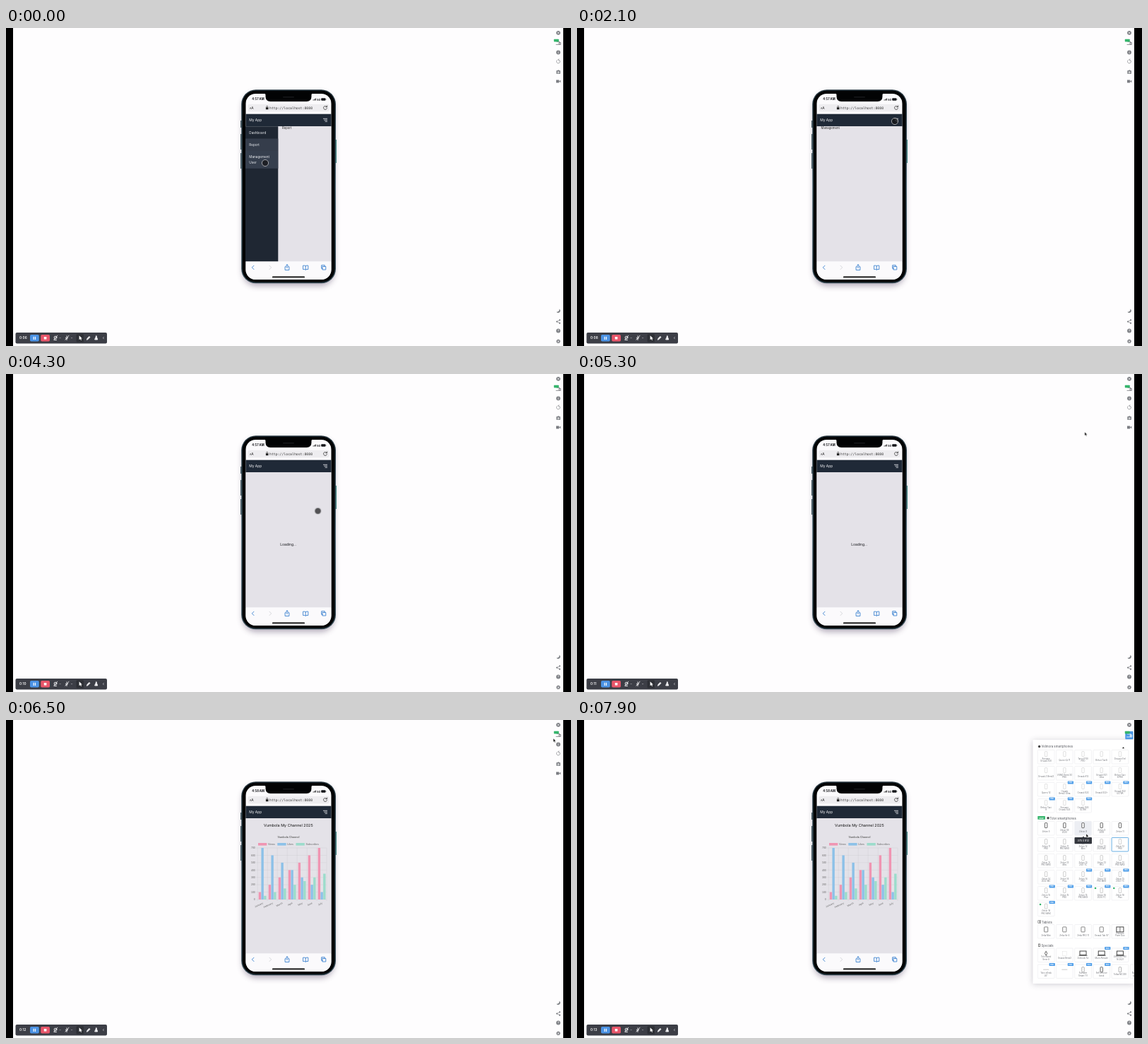
An HTML page for the animation above (8 s loop, 800x450 px).

```html
<!DOCTYPE html>
<html lang="en">
<head>
<meta charset="utf-8">
<title>Mobile preview</title>
<style>
html, body { margin: 0; width: 100%; height: 100%; overflow: hidden; background: #fefdfe; }
svg { display: block; width: 100vw; height: 100vh; font-family: Inter, sans-serif; }
.arial { font-family: "Liberation Sans", Arial, sans-serif; }
.mono { font-family: "DejaVu Sans Mono", monospace; }
.line { fill: none; stroke: currentColor; stroke-linecap: round; stroke-linejoin: round; }
.mid { text-anchor: middle; }
.end { text-anchor: end; }

/* hard switches */
.sw { opacity: 0; animation: 8s step-end infinite; }
.sidebar { animation-name: sidebar; }
.report { animation-name: report; }
.manage { animation-name: manage; }
.manage-wide { animation-name: manage-wide; }
.dash-hover { animation-name: dash-hover; }
.loading { animation-name: loading; }
.chart { animation-name: chart; }
.clock-a { animation-name: clock-a; }
.clock-b { animation-name: clock-b; }
.touch { animation-name: touch; }
.arrow { animation-name: arrow; }
.device-off { animation-name: device-off; }
.device-on { animation-name: device-on; }
.tip { animation-name: tip; }
.ghost { animation-name: ghost; }
.sec { animation-name: sec; }
@keyframes sidebar { 0% { opacity: 1 } 21.1% { opacity: 0 } 29.9% { opacity: 1 } 44.9%, 100% { opacity: 0 } }
@keyframes report { 0% { opacity: 1 } 3.6%, 100% { opacity: 0 } }
@keyframes manage { 0% { opacity: 0 } 3.6% { opacity: 1 } 21.1% { opacity: 0 } 29.9% { opacity: 1 } 44.9%, 100% { opacity: 0 } }
@keyframes manage-wide { 0% { opacity: 0 } 21.1% { opacity: 1 } 29.9%, 100% { opacity: 0 } }
@keyframes dash-hover { 0% { opacity: 0 } 37.4%, 100% { opacity: 1 } }
@keyframes loading { 0% { opacity: 0 } 44.9% { opacity: 1 } 67.4%, 100% { opacity: 0 } }
@keyframes chart { 0% { opacity: 0 } 67.4%, 100% { opacity: 1 } }
@keyframes clock-a { 0% { opacity: 1 } 81.2%, 100% { opacity: 0 } }
@keyframes clock-b { 0% { opacity: 0 } 81.2%, 100% { opacity: 1 } }
@keyframes touch { 0% { opacity: 1 } 55.2%, 100% { opacity: 0 } }
@keyframes arrow { 0% { opacity: 0 } 55.2%, 100% { opacity: 1 } }
@keyframes device-off { 0% { opacity: 1 } 83.7%, 100% { opacity: 0 } }
@keyframes device-on { 0% { opacity: 0 } 83.7%, 100% { opacity: 1 } }
@keyframes tip { 0% { opacity: 0 } 98.6%, 100% { opacity: 1 } }
@keyframes ghost { 0% { opacity: 0 } 95%, 100% { opacity: 1 } }
@keyframes sec { 0% { opacity: 1 } 12.5%, 100% { opacity: 0 } }

/* smooth motion */
.pointer { animation: pointer 8s ease-in-out infinite; }
@keyframes pointer {
  0%, 8.5% { transform: translate(367px, 191px) }
  18.75%, 34.5% { transform: translate(450px, 132px) }
  38.6%, 45.5% { transform: translate(363px, 147px); animation-timing-function: ease-in }
  53.75% { transform: translate(441px, 194px); animation-timing-function: ease-out }
  64%, 66% { transform: translate(720px, 84px) }
  72% { transform: translate(661px, 94px); animation-timing-function: ease-in }
  76.25% { transform: translate(753px, 51px); animation-timing-function: ease-out }
  84.5%, 93.5% { transform: translate(782px, 22px) }
  98.6%, 100% { transform: translate(722px, 163px) }
}
.bars { transform-origin: 0 254px; animation: grow 8s infinite; }
@keyframes grow {
  0%, 68.36% { transform: scaleY(0); animation-timing-function: cubic-bezier(.25, 1, .5, 1) }
  80.86%, 100% { transform: scaleY(1) }
}
.panel { animation: fade 8s linear infinite; }
@keyframes fade { 0%, 86.8% { opacity: 0 } 87.5% { opacity: .35 } 88.75% { opacity: .75 } 91.25%, 100% { opacity: 1 } }
</style>
</head>
<body>
<svg viewBox="0 0 800 450">
  <defs>
    <filter id="soft" x="-30%" y="-20%" width="160%" height="140%"><feGaussianBlur stdDeviation="4"/></filter>
    <linearGradient id="frame" x2="0" y2="1"><stop stop-color="#24343d"/><stop offset=".5" stop-color="#4d6874"/><stop offset="1" stop-color="#2c414b"/></linearGradient>
    <clipPath id="screen"><rect x="339.5" y="93" width="121" height="263" rx="14"/></clipPath>
    <clipPath id="page"><rect x="339" y="139" width="122" height="191.5"/></clipPath>
  </defs>
  <rect width="800" height="450" fill="#fefdfe"/>

  <!-- phone body -->
  <rect x="335" y="92" width="130" height="273" rx="20" fill="#435" opacity=".4" filter="url(#soft)"/>
  <path d="M332.8 131v10M332.8 150v22M332.8 177v22" stroke="#31454f" stroke-width="1.4"/>
  <path d="M467.4 158v33" stroke="#3d8580" stroke-width="1.3"/>
  <rect x="333.2" y="87.3" width="133.8" height="274" rx="20.5" fill="url(#frame)"/>
  <rect x="334.6" y="88.8" width="131" height="271" rx="19" fill="#020304"/>

  <g clip-path="url(#screen)">
    <rect x="339" y="93" width="122" height="264" fill="#fbfafc"/>
    <path d="M365 92h70q-2.500 .5-2.500 3v2q0 7-7 7h-51q-7 0-7-7v-2q0-2.500-2.500-3z" fill="#020304"/>
    <rect x="392" y="97" width="16" height="1.600" rx=".8" fill="#17181b"/>
    <g font-size="4.200" font-weight="700" fill="#15161a">
      <text class="sw clock-a" x="348.300" y="102.300">4:57 AM</text>
      <text class="sw clock-b" x="348.300" y="102.300">4:58 AM</text>
      <text x="440.200" y="102.500" font-size="3.700">5G</text>
    </g>
    <path d="M435 102.500v-1M436.200 102.500v-1.700M437.400 102.500v-2.400M438.600 102.500v-3" stroke="#222" stroke-width=".8"/>
    <rect x="446.200" y="99.300" width="6.300" height="3.500" rx="1" fill="#15161a"/>
    <path d="M453 100.400v1.300" stroke="#333" stroke-width=".6"/>

    <rect x="342.300" y="107.800" width="115.500" height="10.400" rx="2.600" fill="#eeedf0"/>
    <text x="345" y="115" font-size="3.600" fill="#222">A</text>
    <text x="347.300" y="115" font-size="4.800" fill="#222">A</text>
    <rect x="367.900" y="112.300" width="3.600" height="3" rx=".5" fill="#222"/>
    <path class="line" d="M368.700 112.300v-1a1 1 0 0 1 2 0v1" color="#222" stroke-width=".6"/>
    <text class="mono" x="373" y="114.600" font-size="4.830" fill="#333">http://localhost:8080</text>
    <path class="line" d="M454.200 111.600a2.500 2.500 0 1 0 .3 2M454.500 110v1.800h-1.800" color="#222" stroke-width=".7"/>

    <rect x="339" y="121.700" width="122" height="17.500" fill="#1f2937"/>
    <text x="344.300" y="132.200" font-size="4.900" fill="#f3f4f6">My App</text>
    <path d="M449 128.300h6M450.300 130.300h4.700M451.600 132.300h3.400" stroke="#e8eaee" stroke-width=".8"/>

    <!-- page -->
    <rect x="339" y="139.200" width="122" height="191.300" fill="#e4e2e8"/>
    <g clip-path="url(#page)" font-size="4.250" fill="#222">
      <text class="sw report" x="391" y="143.400">Report</text>
      <text class="sw manage" x="391" y="143.400">Management</text>
      <text class="sw manage-wide" x="345.600" y="143.400">Management</text>
    </g>
    <text class="sw loading mid" x="399.700" y="243.200" font-size="4.950" fill="#15161a">Loading...</text>

    <g class="sw sidebar">
      <rect x="339" y="139.200" width="46.300" height="191.300" fill="#1f2733"/>
      <rect class="sw dash-hover" x="339" y="139.200" width="46.300" height="17.300" fill="#303845"/>
      <rect class="sw report" x="339" y="156.500" width="46.300" height="17.500" fill="#353d4b"/>
      <rect x="339" y="174" width="46.300" height="24.800" fill="#363f4e"/>
      <g font-size="4.650" fill="#eceef2">
        <text x="344.300" y="149.700">Dashboard</text>
        <text x="344.300" y="167">Report</text>
        <text x="344.300" y="184.400">Management</text>
        <text x="344.300" y="191.600">User</text>
      </g>
    </g>

    <g class="sw chart">
      <text class="mid" x="399.800" y="151.400" font-size="5.450" fill="#111">Vumbola My Channel 2025</text>
      <g class="arial" font-size="3.700" fill="#666">
        <text class="mid" x="400" y="166.500" font-weight="700">Vumbola Channel</text>
        <g id="axes"></g>
      </g>
      <g class="bars" id="bars"></g>
    </g>

    <!-- browser bar -->
    <rect x="339" y="330.500" width="122" height="26" fill="#fbfafc"/>
    <g class="line" color="#3b82d0" stroke-width=".9">
      <path d="M351 336.200l-2.700 2.700 2.700 2.700"/>
      <path d="M373 336.200l2.700 2.700-2.700 2.700" color="#d3d4d8"/>
      <path d="M396.600 337.800h-1.500v4.700h5.800v-4.700h-1.500M398 339.800v-5M396.500 336.200l1.500-1.500 1.500 1.500"/>
      <path d="M424.200 336.800q-1.800-1.200-3.600-.6v5.400q1.800-.5 3.600.5q1.800-1 3.600-.5v-5.400q-1.800-.6-3.600.6v5.300"/>
      <path d="M448.300 337.500h4.500v4.500h-4.500zM448.300 340.300h-1.600v-4.600h4.600v1.800"/>
    </g>
    <rect x="377" y="351.600" width="46" height="1.700" rx=".85" fill="#050505"/>
  </g>

  <!-- recorder -->
  <rect x="13.500" y="431" width="129.500" height="15.500" rx="2" fill="#3c3e46"/>
  <g id="timer" font-size="4.700" font-weight="600" fill="#fff"></g>
  <rect x="34" y="434" width="12.800" height="9.600" rx="1.800" fill="#4b92e4"/>
  <path d="M39.200 436.700v4.200M41.500 436.700v4.200" stroke="#fff" stroke-width="1.200"/>
  <rect x="49.200" y="434" width="12.800" height="9.600" rx="1.800" fill="#e8566a"/>
  <rect x="53.800" y="437" width="3.600" height="3.600" rx=".4" fill="#fff"/>
  <rect x="99.500" y="433" width="10.500" height="11.500" rx="1.500" fill="#2d2f35"/>
  <g class="line" color="#f2f2f4" stroke-width=".9">
    <circle cx="70" cy="438" r="1.900"/><path d="M68.500 441.500h3M67.700 441.200l5-6"/>
    <path d="M86 435.800v2.800M84.300 438.400q1.700 2.800 3.400 0M86 440v1.600M84 441.200l5-6"/>
    <path d="M76 438.500l.6.600.6-.6M92.500 438.500l.6.600.6-.6" stroke-width=".5"/>
    <path d="M114.500 441l.6-1.800 2.800-2.800 1.100 1.100-2.800 2.800z" fill="#f2f2f4"/>
    <path d="M126 441h3.700l-1-3h-1.600zM127.300 438v-2.200h1v2.200" fill="#f2f2f4"/>
    <path d="M138.400 437.400l-1 1.200 1 1.200" stroke-width=".6"/>
  </g>
  <path d="M103.600 435.300v6l1.500-1.300 1 2 .9-.5-1-1.900 1.900-.2z" fill="#fff"/>

  <!-- tool icons -->
  <g fill="#7b7d82">
    <circle cx="782" cy="6.800" r="2.900"/><circle cx="782" cy="34.500" r="2.900"/><circle cx="782" cy="428.500" r="2.900"/>
    <path d="M779.300 60.300h1.400l.6-.8h1.600l.6.800h1.400v4.500h-5.600zM779 73.500h4v4h-4zM783.300 75l2-1.300v3.600l-2-1.300z"/>
    <path d="M783.400 397.500a3 3 0 1 1-4 4.300a3.600 3.600 0 0 0 4-4.300z"/>
    <circle cx="780" cy="415.500" r="1.100"/><circle cx="784" cy="413.300" r="1.100"/><circle cx="784" cy="417.700" r="1.100"/>
  </g>
  <g class="line" color="#7b7d82" stroke-width=".7">
    <path d="M780.200 45.600a2.500 2.500 0 1 0 2-.7M782.800 43.800l-1 1.100 1 1M784 413.300l-4 2.200 4 2.200"/>
    <circle cx="782" cy="443.400" r="1.700" stroke-width="1.500"/>
    <circle cx="782" cy="443.400" r="2.700" stroke-width=".8" stroke-dasharray="1 1.120" stroke-linecap="butt"/>
  </g>
  <g class="line" color="#fff" stroke-width=".7">
    <path d="M780.900 5.700l2.200 2.200M783.100 5.700l-2.200 2.200M782 34.200v1.700M782 32.800v.1"/>
    <path d="M781.100 427.600q.9-1.400 1.800-.2q0 .7-.9 1.200M782 430v.1" stroke-width=".6"/>
    <circle cx="782" cy="62.600" r="1"/>
  </g>
  <g class="sw device-off">
    <path class="line" d="M779 23.500h3.500M780 19.500h4v4M783.300 20.500h2v3h-2z" color="#7b7d82" stroke-width=".8"/>
  </g>
  <rect class="sw device-off" x="775.800" y="15.800" width="7" height="3.600" rx=".6" fill="#35b56c"/>

  <g class="panel">
    <rect x="645" y="29" width="144" height="345" fill="#556" opacity=".28" filter="url(#soft)"/>
    <rect x="645.500" y="28" width="143" height="345" fill="#fff"/>
    <g id="devices" fill="#6d6f75"></g>
  </g>
  <path class="sw ghost" d="M773.500 38l1.500 2.300h-3z" fill="#222"/>
  <g class="sw device-on">
    <rect x="776.300" y="16" width="11.200" height="11.300" rx=".8" fill="#4a97e6"/>
    <path class="line" d="M778.500 24h4M779.500 20h4.500v4M783.700 21h2v3h-2z" color="#fff" stroke-width=".8"/>
    <rect x="775.800" y="15.800" width="7" height="3.600" rx=".6" fill="#35b56c"/>
  </g>
  <g class="sw tip">
    <path d="M715.600 166l1.400-1.600 1.400 1.600h9.600q1 0 1 1v7.300q0 1-1 1h-22.500q-1 0-1-1v-7.300q0-1 1-1z" fill="#33363d"/>
    <text class="mid" x="716.700" y="172" font-size="3.700" fill="#fff">375 x 812</text>
  </g>

  <rect width="10" height="450"/><rect x="789" width="11" height="450"/>

  <g class="pointer">
    <circle class="sw touch" r="4.600" fill="#141416" fill-opacity=".7" stroke="#d8d8dc" stroke-opacity=".75" stroke-width=".9"/>
    <path class="sw arrow" d="M-1-2v5.200l1.200-1.100.9 1.800.9-.4-.9-1.800h1.600z" fill="#111" stroke="#fff" stroke-width=".4"/>
  </g>
</svg>
<script>
const fill = (id, html) => { document.getElementById(id).innerHTML = html; };
const range = n => [...Array(n).keys()];
const rect = (x, y, w, h, attrs = '') => `<rect x="${x}" y="${y}" width="${w}" height="${h}" ${attrs}/>`;
const text = (x, y, s, attrs = '') => `<text x="${x}" y="${y}" ${attrs}>${s}</text>`;
const path = (d, attrs) => `<path d="${d}" fill="none" ${attrs}/>`;

fill('timer', range(8).map(i =>
  text(19, 440.4, `0:${String(6 + i).padStart(2, '0')}`, `class="sw sec" style="animation-delay:${i ? i - 8 : 0}s"`)).join(''));

// bar chart
const left = 356.2, base = 254, slot = 14, unit = 73 / 700;
const colors = ['#f095b2', '#8cc1e8', '#9cdccb'];
const months = ['January', 'February', 'March', 'April', 'May', 'June', 'July'];
const legend = [['Views', 357], ['Likes', 384.3], ['Subscribes', 410.5]];
const grid = 'stroke="#000" stroke-opacity=".1" stroke-width=".4"';
fill('axes',
  legend.map(([name, x], i) => rect(x, 174, 12.3, 3.6, `fill="${colors[i]}"`) + text(x + 14, 177.1, name)).join('') +
  range(8).map(i => {
    const y = base - i * 100 * unit;
    return path(`M353.800 ${y}H${left + 7 * slot}`, grid) +
      path(`M${left + i * slot} 181V256`, grid) +
      text(352.8, y + 1.3, i * 100, 'class="end" font-size="3.5"');
  }).join('') +
  months.map((m, i) => {
    const x = left + (i + .5) * slot + .8;
    return text(x, 260, m, `class="end" font-size="3.5" transform="rotate(-26 ${x} 260)"`);
  }).join(''));
fill('bars', range(7).map(i => [100 * (i + 1), 700 - 100 * i, 50 * (i + 1)].map((v, k) =>
  rect(left + i * slot + 1.5 + k * 3.73, base - v * unit, 3.4, v * unit, `fill="${colors[k]}"`)).join('')).join(''));

// device panel: [row centre, icon, labels, columns with a tag]
const rows = [
  [52, 'thin', 'Sorvane/Orvask S20;Quorvi Qi 11;Tarvol P30/PRO;Belvor Tavi5;Dovarin Fjel/2', ''],
  [75, 'thin', 'Orvask Z Bend3;VUMO Seek X3/PRO;Orvask A12;Orvask S21/Ultra;Belvor Tavi/6 PRO', ''],
  [98, 'thin', 'Quorvi 12;Orvask/Bend2 Ultra;Orvask S22;Orvask S22+;Orvask S22/ULTRA', '1234'],
  [121, 'thin', 'Belvor Tavi/8;Sorvane/Orvask S24;Orvask S24/ULTRA', '012'],
  [153, 'bold', 'Zelvin 5;Zelvin SE/2020;Zelvin 8;Zelvin X/2018;Zelvin 11', ''],
  [176, 'phone', 'Zelvin 11/PRO;Zelvin 11/PRO MAX;Zelvin 12/Mini;Zelvin 12/2020 MC;Zelvin 12/PRO', ''],
  [199, 'phone', 'Zelvin 12/PRO MAX;Zelvin 13/Mini;Zelvin 13/2021 TC;Zelvin 13/PRO;Zelvin 13/PRO MAX', ''],
  [222, 'phone', 'Zelvin 14/2022 MC;Zelvin 14/Plus;Zelvin 14/PRO;Zelvin 14/PRO MAX;Zelvin 15/2023 TC', '234'],
  [245, 'phone', 'Zelvin 15/Plus;Zelvin 15/PRO;Zelvin 15/PRO MAX;Zelvin 16/2024 TC;Zelvin 16/Plus', '01234'],
  [267.5, 'phone', 'Zelvin 16/PRO MAX', '0'],
  [299, 'tablet', 'Zelta Mini;Zelta Air 4;Zelta PRO 11;Orvask Tab S7;Plenivox/Pane Duo', ''],
  [332.5, 'special', 'Tolvi Band/Serie 6;Orvask Bend2;Zorbook Air;Murn Altitude;Zorbook PRO/16 2021', '34'],
  [355.5, 'special', 'Tolvi zDesk/24&quot;;Sorvane/Smart TV;Self service/kiosk;Tolba MC330;Non-branded/smartphone', '0123'],
];
const stroke = (w, c = '#555') => `fill="#fff" stroke="${c}" stroke-width="${w}"`;
const phone = (x, y, w, c) => rect(x - 1.7, y - 3.5, 3.4, 7, `rx=".6" ${stroke(w, c)}`);
const laptop = (x, y) => rect(x - 4.5, y - 3.2, 9, 5.6, stroke(.9, '#333')) + path(`M${x - 6} ${y + 3.1}h12`, 'stroke="#444" stroke-width=".8"');
const icons = {
  thin: (x, y) => phone(x, y, .35, '#aaa'),
  phone: (x, y) => phone(x, y, .4, '#888'),
  bold: (x, y) => phone(x, y, .8, '#444'),
  tablet: (x, y, i) => i < 4
    ? rect(x - 2.6, y - 2.2, 5.2, 7, `rx=".6" ${stroke(.7, '#555')}`)
    : rect(x - 5, y - 2.2, 10, 7, stroke(.9, '#333')) + path(`M${x} ${y - 2}v6.600`, 'stroke="#333" stroke-width=".7"'),
  special: (x, y, i, c) => {
    y += 1.6;
    if (c < 340) return i > 1 ? laptop(x, y)
      : i ? rect(x - 3, y - 3, 6, 6, stroke(.3, '#ccc'))
      : path(`M${x} ${y - 3.5}v7`, 'stroke="#777" stroke-width="1.3"') + `<circle cx="${x}" cy="${y}" r="1.700" ${stroke(.7, '#444')}/>`;
    return i < 2 ? path(`M${x - 4} ${y}h8`, 'stroke="#aaa" stroke-width=".6"') : phone(x, y, i === 3 ? 1 : .5, '#666');
  },
};
const tag = (x, y, w, h, c, s) => rect(x, y, w, h, `rx=".5" fill="${c}"`) +
  text(x + w / 2, y + h - 1, s, 'class="mid" font-size="2.5" font-weight="700" fill="#fff"');

const cell = ([c, icon, , tags], label, i) => {
  const x = 652.3 + i * 26.2, y = c - 9.6, cx = x + 11.8;
  const lines = label.split('/');
  const chosen = c === 176 && i === 4;
  const single = icon === 'tablet' ? 6.8 : 5.5;
  return rect(x, y, 23.7, 19.6, `rx="1" fill="#fff" stroke="${chosen ? '#58a6e0' : '#e4e5e9'}" stroke-width="${chosen ? .9 : .5}"`) +
    (c === 153 && i === 2 ? rect(x, y, 23.7, 19.6, 'class="sw tip" style="fill:#eceef3"') : '') +
    icons[icon](cx, c - 3.9, i, c) +
    lines.map((s, k) => text(cx, c + (lines.length > 1 ? 3.7 + k * 3.5 : single), s, 'class="mid" font-size="2.9"')).join('') +
    (tags.includes(i) ? tag(x + 16.3, y - 2, 8.2, 4, '#4a9be8', 'PRO') : '');
};
const dot = (x, y) => `<circle cx="${x}" cy="${y}" r="1.300" fill="#35b56c"/>`;
const heading = (x, y, s) => text(x, y, s, 'font-size="4.3" fill="#55575d"');
fill('devices',
  `<circle cx="654.600" cy="37.500" r="1.700" fill="#444"/>` + heading(657.5, 39.2, 'Velmora smartphones') +
  tag(652.3, 136, 10.6, 4.8, '#35b56c', 'NEW') +
  `<circle cx="667" cy="138.700" r="1.700" fill="#444"/>` + heading(669.5, 140.5, 'Tolvi smartphones') +
  rect(652.8, 283.8, 2, 3.6, stroke(.5)) + rect(655.3, 283.8, 1.5, 3.6, stroke(.5)) + heading(658, 287.6, 'Tablets') +
  rect(653.5, 317, 2.2, 3.6, stroke(.7)) + heading(657.5, 320.6, 'Specials') +
  rows.map(row => row[2].split(';').map((label, i) => cell(row, label, i)).join('')).join('') +
  dot(734, 238) + dot(760.3, 238) + dot(656, 261));
</script>
</body>
</html>
```
